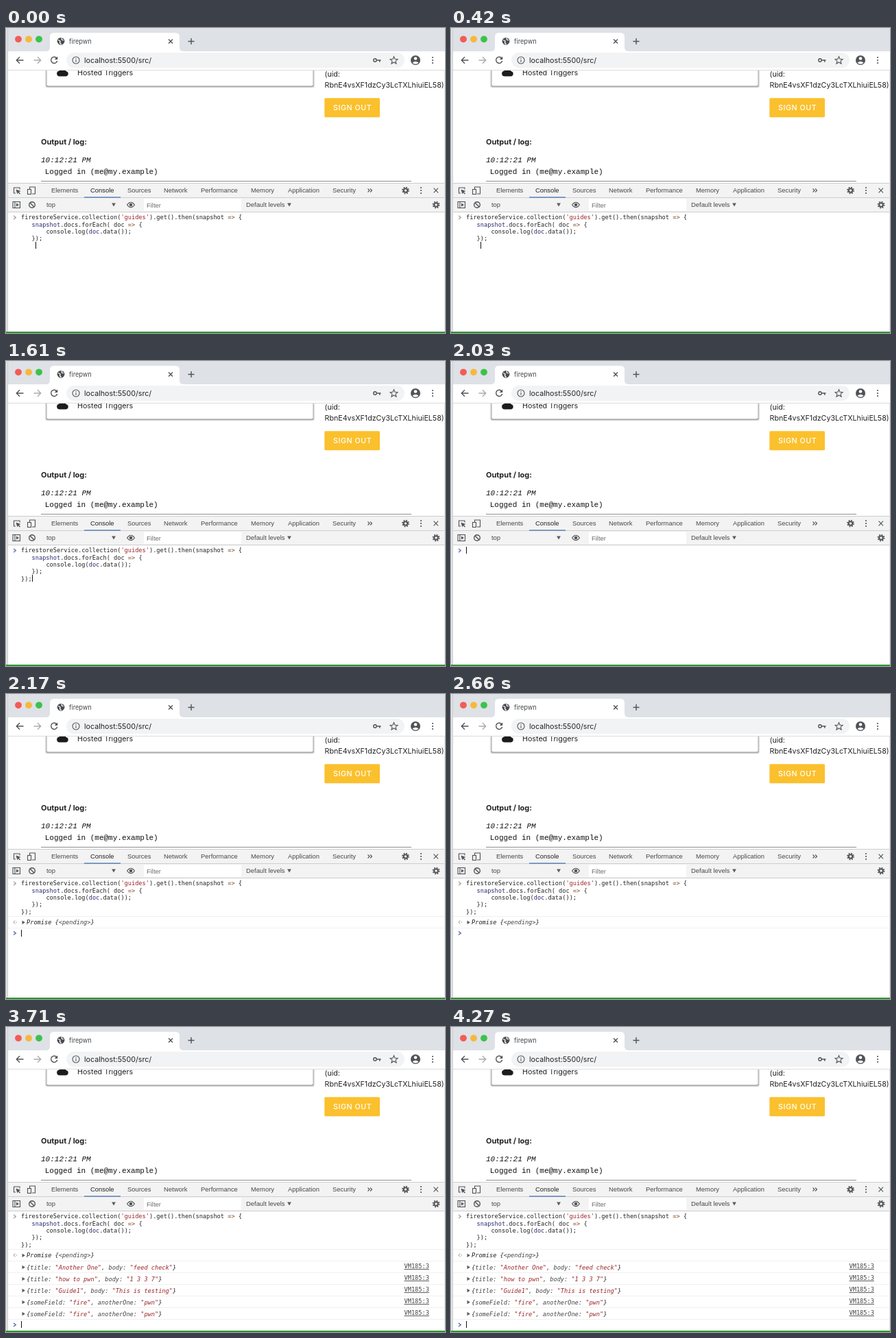
Recreate the animation shown at these times as an HTML page. Size 640x445 px, loop 4.34 s.

```html
<!DOCTYPE html>
<html lang="en">
<head>
<meta charset="utf-8">
<title>Console session</title>
<style>
  html, body { margin: 0; width: 100%; height: 100%; overflow: hidden; background: #fff; }
  svg { display: block; width: 640px; height: 445px; }
  text { white-space: pre; }
  .page { font-family: Inter, "Open Sans", sans-serif; font-size: 10.7px; fill: #222; }
  .log { font-family: "Liberation Mono", monospace; font-size: 11px; fill: #111; }
  .ui { font-family: "Liberation Sans", sans-serif; font-size: 9.42px; fill: #484848; }
  .mono { font-family: "DejaVu Sans Mono", monospace; font-size: 8.63px; fill: #222; }
  .it { font-style: italic; }
  .str { fill: #9c2428; }
  .op { fill: #7c4a28; }
  .loc { fill: #2a2a70; }
  .key { fill: #444; }
  .icon { fill: none; stroke: #505357; stroke-width: 1.4; }
  .thin { stroke-width: 1.1; }
  .dot { fill: #505357; }
  .gray { fill: none; stroke: #8a8a8a; stroke-width: 1.1; }
  .blue { fill: none; stroke: #4a62a4; stroke-width: 1.2; }

  .anim { animation: 4340ms step-end infinite; }
  #code { animation-name: code; }
  #close { animation-name: close; }
  #paren { animation-name: paren; }
  #semi { animation-name: semi; }
  #braces { animation-name: braces; }
  #parens { animation-name: parens; }
  #live { animation-name: live; }
  #echo { animation-name: echo; }
  #promise { animation-name: promise; }
  #wait { animation-name: wait; }
  #results { animation-name: results; }
  #caret { animation-name: caret; }

  @keyframes code { 0%, 48.387%, 100% { opacity: 1 } 45.161% { opacity: 0 } }
  @keyframes close { 0% { opacity: 0 } 22.58%, 100% { opacity: 1 } }
  @keyframes paren { 0% { opacity: 0 } 27.419%, 100% { opacity: 1 } }
  @keyframes semi { 0% { opacity: 0 } 32.258%, 100% { opacity: 1 } }
  @keyframes braces { 0%, 27.419%, 100% { opacity: 0 } 22.58% { opacity: 1 } }
  @keyframes parens { 0%, 32.258%, 100% { opacity: 0 } 27.419% { opacity: 1 } }
  @keyframes live { 0%, 48.387%, 100% { opacity: 0 } 22.58% { opacity: 1 } }
  @keyframes echo { 0%, 48.387%, 100% { opacity: 1 } 22.58% { opacity: 0 } }
  @keyframes promise { 0% { opacity: 0 } 48.387%, 100% { opacity: 1 } }
  @keyframes wait { 0%, 62.903%, 100% { opacity: 0 } 48.387% { opacity: 1 } }
  @keyframes results { 0% { opacity: 0 } 62.903%, 100% { opacity: 1 } }
  @keyframes caret {
    0% { transform: translate(43px, 317px); opacity: 1 }
    11.29% { transform: translate(43px, 317px); opacity: 0 }
    16.129% { transform: translate(22px, 317px); opacity: 1 }
    22.58% { transform: translate(27px, 317px); opacity: 1 }
    27.419% { transform: translate(33px, 317px); opacity: 1 }
    32.258% { transform: translate(38px, 317px); opacity: 1 }
    45.161% { transform: translate(22px, 276px); opacity: 1 }
    48.387% { transform: translate(22px, 349px); opacity: 1 }
    61.29% { transform: translate(22px, 349px); opacity: 0 }
    62.903% { transform: translate(22px, 434px); opacity: 0 }
    74.193% { transform: translate(22px, 434px); opacity: 1 }
    87.096% { transform: translate(22px, 434px); opacity: 0 }
    98.387%, 100% { transform: translate(22px, 434px); opacity: 1 }
  }
</style>
</head>
<body>
<svg viewBox="0 0 640 445">
  <defs>
    <filter id="soft" x="-5%" y="-50%" width="110%" height="200%"><feGaussianBlur stdDeviation="1"/></filter>
    <path id="chevron" d="M-2 -2.6 1.4 0 -2 2.6"/>
    <path id="tri" d="M0 -2.8 4.4 0 0 2.8Z" fill="#5c5c5c"/>
    <path id="down" d="M-2.9 -2.4H2.9L0 2.6Z" fill="#5c5c5c"/>
    <g id="gear" fill="none" stroke="#505357">
      <circle r="4.5" stroke-width="1.8" stroke-dasharray="1.77 1.77"/>
      <circle r="2.8" stroke-width="2"/>
    </g>
    <g id="dots" class="dot"><circle cy="-4" r="1.1"/><circle r="1.1"/><circle cy="4" r="1.1"/></g>
  </defs>
  <rect width="640" height="445" fill="#fff"/>

  <!-- tab strip -->
  <rect width="640" height="34" fill="#dee1e6"/>
  <circle cx="18" cy="16.3" r="4.9" fill="#f25c56"/>
  <circle cx="33" cy="16.3" r="4.9" fill="#f6b83c"/>
  <circle cx="48" cy="16.3" r="4.9" fill="#3cc24c"/>
  <path d="M58 34Q64 34 64 28V13Q64 7 70 7H247Q253 7 253 13V28Q253 34 259 34Z" fill="#fff"/>
  <circle cx="80" cy="19.3" r="5.4" fill="#4a4d51"/>
  <path d="M76 17.5 79 19 78.5 21.5 80.5 24M81 14.5 81.5 17 84 18" fill="none" stroke="#fff" stroke-width="1.3"/>
  <text class="page" x="92" y="22.5" style="font-size:9.2px;fill:#45494d">firepwn</text>
  <path class="icon" d="M237 16.5 243 22.5M243 16.5 237 22.5M265.5 19.5H274.5M270 15V24"/>

  <!-- address bar -->
  <rect x="88" y="36" width="493" height="22" rx="11" fill="#f1f3f4"/>
  <path class="icon" d="M25.5 47H15.5M20 42.3 15.3 47 20 51.7"/>
  <path class="icon" d="M40.5 47H50.5M46 42.3 50.7 47 46 51.7" style="stroke:#a9acb0"/>
  <path class="icon" d="M74 44.2A4.6 4.6 0 1 0 74.7 48"/>
  <path class="dot" d="M75.2 41.5V46H70.7Z"/>
  <circle class="icon thin" cx="102" cy="47" r="5"/>
  <path class="icon thin" d="M102 46.3V49.8M102 44V45.2"/>
  <text class="page" x="114" y="51">localhost:5500/src/</text>
  <circle class="icon" cx="538" cy="47" r="2.2"/>
  <path class="icon" d="M540.5 47H546.5M544.7 47V49.8"/>
  <path class="icon thin" d="M565.5 41.6 567 45.3 571 45.6 568 48.2 569 52 565.5 50 562 52 563 48.2 560 45.6 564 45.3Z"/>
  <circle class="dot" cx="597" cy="47" r="7"/>
  <circle cx="597" cy="44.5" r="2.3" fill="#fff"/>
  <path d="M592.5 50.8Q597 46.5 601.5 50.8Q597 54.5 592.5 50.8Z" fill="#fff"/>
  <use href="#dots" x="622" y="47"/>
  <path d="M0 61.5H640" stroke="#dcdcdc"/>

  <!-- page -->
  <svg y="62" width="640" height="164" viewBox="0 62 640 164">
    <rect x="58.5" y="40" width="390" height="46" fill="#666" opacity=".8" filter="url(#soft)"/>
    <rect x="59.5" y="40" width="388" height="44.5" rx="2" fill="#fff"/>
    <path d="M77.5 70.5A4 4 0 0 1 77.5 62.6A6 6 0 0 1 87.5 63A3.8 3.8 0 0 1 87.5 70.5Z" fill="#1c1c1c"/>
    <text class="page" x="104" y="69">Hosted Triggers</text>
    <text class="page" x="464.5" y="71">(uid:</text>
    <text class="page" x="464.5" y="87">RbnE4vsXF1dzCy3LcTXLhiuiEL58)</text>
    <rect x="464.3" y="102.3" width="80.7" height="28" rx="1.5" fill="#fbc02d"/>
    <text class="page" x="477" y="120.3" style="fill:#fff;font-weight:500;letter-spacing:.55px">SIGN OUT</text>
    <text class="page" x="51" y="169.5" style="font-size:11px;font-weight:700">Output / log:</text>
    <text class="log it" x="51" y="196.3">10:12:21 PM</text>
    <text class="log" x="56.7" y="213">Logged in (me@my.example)</text>
    <path d="M51 223.5H591" stroke="#8c8c8c"/>
  </svg>

  <!-- devtools bars -->
  <rect y="226" width="640" height="42" fill="#f3f3f3"/>
  <path d="M0 226.5H640M0 247.5H640M0 268.5H640" stroke="#cdcdcd"/>
  <rect x="114" y="246.3" width="53" height="1.5" fill="#5b83b8"/>
  <path class="icon thin" d="M14 241H11.5V233H20V235.5"/>
  <path class="dot" d="M14.5 235.5 21.5 238 18.7 239.2 21 241.5 20 242.5 17.6 240.2 16.5 242.5Z"/>
  <path class="icon thin" d="M34.5 235V232H42.5V242H38"/>
  <rect class="icon thin" x="31.5" y="235.5" width="5" height="7"/>
  <g id="tabs" class="ui"></g>
  <path class="icon thin" d="M527.5 234.5 530 237 527.5 239.5M531 234.5 533.5 237 531 239.5"/>
  <use href="#gear" x="582.5" y="237"/>
  <use href="#dots" x="605" y="237"/>
  <path class="icon thin" d="M623.5 233.7 630 240.3M630 233.7 623.5 240.3"/>

  <rect class="icon thin" x="10" y="253.5" width="10.5" height="9"/>
  <path class="icon thin" d="M13 253.5V262.5"/>
  <path class="dot" d="M15 255.5 19 258 15 260.5Z"/>
  <circle class="icon" cx="38" cy="258" r="4.3"/>
  <path class="icon" d="M35 255 41 261"/>
  <text class="ui" x="59" y="261.3">top</text>
  <use href="#down" x="157" y="258"/>
  <path class="icon thin" d="M176.5 258Q182 250.5 187.5 258Q182 265.5 176.5 258Z"/>
  <circle class="dot" cx="182" cy="258" r="2.3"/>
  <rect x="201" y="249" width="142" height="18" fill="#fff"/>
  <text class="ui" x="205" y="261.5" style="fill:#6c6c6c">Filter</text>
  <text class="ui" x="350" y="261.3">Default levels</text>
  <use href="#down" x="413" y="258"/>
  <use href="#gear" x="627" y="258"/>

  <!-- console -->
  <use id="echo" class="anim gray" href="#chevron" x="13" y="276.5"/>
  <use id="live" class="anim blue" href="#chevron" x="13" y="276.5"/>
  <g id="code" class="anim mono">
    <text x="22" y="279.3">firestoreService.collection(<tspan class="str">'guides'</tspan>).get().then(snapshot <tspan class="op">=&gt;</tspan> {</text>
    <text x="37.6" y="289.6"><tspan class="loc">snapshot</tspan>.docs.forEach( doc <tspan class="op">=&gt;</tspan> {</text>
    <text x="58.4" y="299.9">console.log(<tspan class="loc">doc</tspan>.data());</text>
    <text x="37.6" y="310.2">});</text>
  </g>
  <path id="braces" class="anim" d="M339 281.5H344.2M22 322.5H27.2" stroke="#555"/>
  <path id="parens" class="anim" d="M271.4 281.5H276.6M27.2 322.5H32.4" stroke="#555"/>

  <g id="promise" class="anim">
    <path d="M13.5 330.7 11 333 13.5 335.3" class="gray" style="stroke:#b0b0b0"/>
    <circle cx="15.5" cy="333" r=".8" fill="#b0b0b0"/>
    <path d="M3 324.5H640M3 341.5H640" stroke="#f0f0f0"/>
    <use href="#tri" x="23.5" y="333.3"/>
    <text class="mono it" x="30" y="336.3">Promise {<tspan class="key">&lt;pending&gt;</tspan>}</text>
  </g>
  <use id="wait" class="anim blue" href="#chevron" x="13" y="349"/>
  <g id="results" class="anim">
    <g id="rows" class="mono"></g>
    <use href="#chevron" class="blue" x="13" y="434.5"/>
  </g>
  <rect id="caret" class="anim" y="-5" width="1" height="10" fill="#111"/>

  <!-- window edges -->
  <rect width="2" height="445" fill="#e4e5e7"/>
  <path d="M2.5 0V443" stroke="#c8cacc"/>
  <path d="M639.5 62V443" stroke="#e4e4e4"/>
  <rect y="443" width="640" height="2" fill="#2c962f"/>
</svg>
<script>
  const $ = id => document.getElementById(id);
  const el = (parent, tag, attrs, text = '') => {
    const node = document.createElementNS('http://www.w3.org/2000/svg', tag);
    for (const name in attrs) node.setAttribute(name, attrs[name]);
    node.textContent = text;
    return parent.appendChild(node);
  };

  const tabs = {
    Elements: 66, Console: 123, Sources: 177, Network: 230,
    Performance: 284, Memory: 357, Application: 411, Security: 476
  };
  for (const name in tabs) {
    const fill = name === 'Console' ? '#222' : '#484848';
    el($('tabs'), 'text', { x: tabs[name], y: 240.3, fill }, name);
  }

  // Closing characters, typed one by one
  ['close', 'paren', 'semi'].forEach((id, i) =>
    el($('code'), 'text', { id, class: 'anim', x: 22 + i * 5.195, y: 320.5 }, '});'[i]));

  const docs = [
    { title: 'Another One', body: 'feed check' },
    { title: 'how to pwn', body: '1 3 3 7' },
    { title: 'Guide1', body: 'This is testing' },
    { someField: 'fire', anotherOne: 'pwn' },
    { someField: 'fire', anotherOne: 'pwn' }
  ];
  docs.forEach((doc, i) => {
    const rows = $('rows'), y = 350.5 + i * 17;
    el(rows, 'use', { href: '#tri', x: 23.5, y });
    const line = el(rows, 'text', { class: 'it', x: 30, y: y + 3 }, '{');
    Object.entries(doc).forEach(([key, value], k) => {
      el(line, 'tspan', { class: 'key' }, (k ? ', ' : '') + key + ': ');
      el(line, 'tspan', { class: 'str' }, `"${value}"`);
    });
    el(line, 'tspan', {}, '}');
    el(rows, 'text', { x: 580.5, y: y + 1.5, fill: '#444', 'text-decoration': 'underline' }, 'VM185:3');
    el(rows, 'path', { d: `M3 ${y + 8}H640`, stroke: '#f0f0f0' });
  });
</script>
</body>
</html>
```
